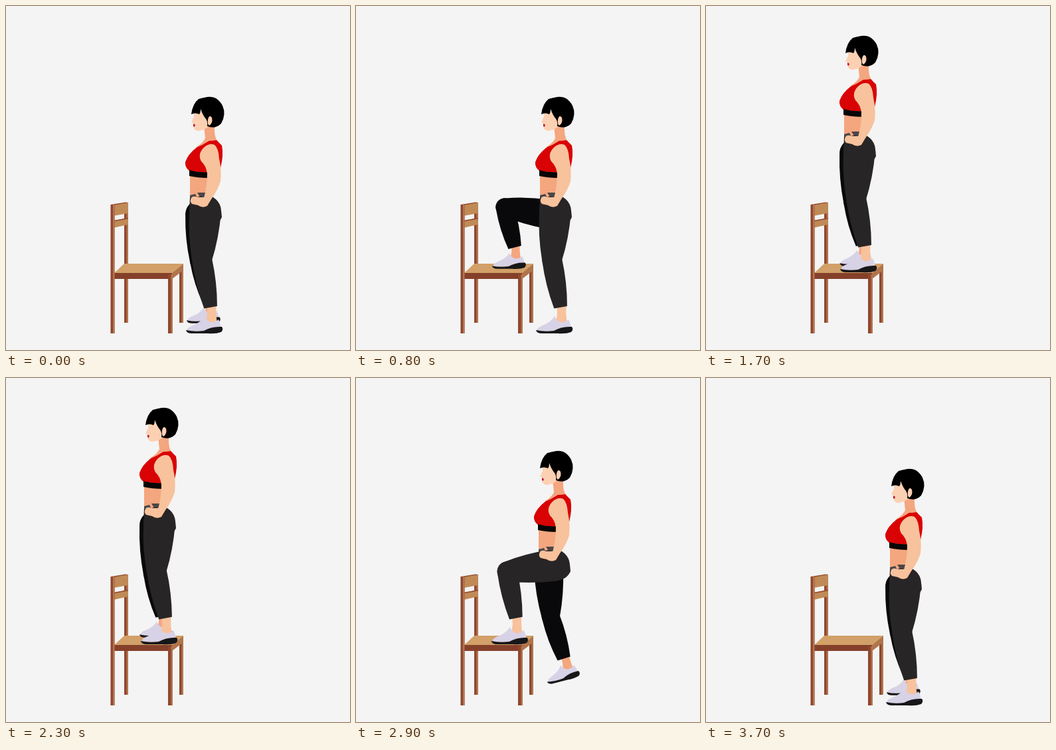
Animation of 518 by 518 pixels, one loop 4 s. Source, as an HTML page with a canvas:

```html
<!DOCTYPE html>
<html lang="en">
<head>
<meta charset="utf-8">
<title>Chair step-up</title>
<style>
html, body { margin: 0; width: 100%; height: 100%; overflow: hidden; background: #f4f4f4; }
canvas { display: block; width: 518px; height: 518px; }
</style>
</head>
<body>
<canvas id="stage"></canvas>
<script>
const canvas = document.getElementById('stage');
const ctx = canvas.getContext('2d');
const dpr = window.devicePixelRatio || 1;
canvas.width = canvas.height = 518 * dpr;

const SKIN = '#f7c29c', WARM = '#f4a67f';

// Key points: time, x, y
const bodyKeys = [
  [900, 0, 0], [1300, -14, -58], [1700, -69, -92],
  [2400, -69, -92], [2600, -35, -79], [2900, -2, -27], [3050, 0, 0]
];
// Each leg: hip, bone lengths, and ankle key points: time, x, y, foot angle
const near = {
  color: '#282526', skin: SKIN, hip: [300, 309, 24], thigh: 71, shank: 71, knee: 15, size: 1,
  keys: [
    [900, 308, 453, 0], [1300, 318, 384, -18], [1600, 205, 352, 0], [1700, 239, 361, 0],
    [3000, 241, 361, 0], [3300, 282, 376, -12], [3600, 308, 453, 0]
  ]
};
const far = {
  color: '#09090b', skin: WARM, hip: [292, 314, 22], thigh: 69, shank: 62, knee: 13.5, size: 0.92,
  keys: [
    [0, 306, 445, 0], [300, 284, 390, -14], [600, 200, 356, 0], [800, 239, 363, 0],
    [1300, 236, 360, 0], [2400, 235, 358, 0], [2600, 281, 365, -18], [2900, 313, 422, -14],
    [3000, 306, 445, 0]
  ]
};

// Monotone cubic through the keys: smooth, without overshoot
function at(keys, t) {
  const last = keys.length - 1;
  const i = keys.findIndex(k => k[0] > t);
  if (i <= 0) return keys[i ? last : 0].slice(1);
  const [a, b] = [keys[i - 1], keys[i]], span = b[0] - a[0], p = (t - a[0]) / span;
  const slope = (n, j) => n < 1 || n > last ? 0 : (keys[n][j] - keys[n - 1][j]) / (keys[n][0] - keys[n - 1][0]);
  const tangent = (n, j) => {
    const u = slope(n, j), v = slope(n + 1, j);
    return u * v > 0 ? 2 * u * v / (u + v) : 0;
  };
  return a.slice(1).map((v, k) => {
    const j = k + 1;
    return v + (b[j] - v) * p * p * (3 - 2 * p)
      + span * p * (1 - p) * (tangent(i - 1, j) * (1 - p) - tangent(i, j) * p);
  });
}

function fill(color, d) {
  ctx.fillStyle = color;
  ctx.fill(new Path2D(d));
}

function rect(color, x, y, w, h) {
  ctx.fillStyle = color;
  ctx.fillRect(x, y, w, h);
}

// Tapered limb segment with bulging sides and a round or flat end
function taper(color, ax, ay, ra, bx, by, rb, flat) {
  const dir = Math.atan2(by - ay, bx - ax);
  const open = Math.acos((ra - rb) / Math.hypot(bx - ax, by - ay));
  const edge = (x, y, r, angle) => [x + r * Math.cos(angle), y + r * Math.sin(angle)];
  const side = (angle, end) => ctx.quadraticCurveTo(
    ...edge((ax + bx) / 2, (ay + by) / 2, (ra + rb) / 2 + 4, angle), ...end);
  const left = dir - open, right = dir + open;
  ctx.fillStyle = color;
  ctx.beginPath();
  ctx.arc(ax, ay, ra, right, left + 2 * Math.PI);
  side(left, edge(bx, by, rb, left));
  if (flat) ctx.lineTo(...edge(bx, by, rb, right));
  else ctx.arc(bx, by, rb, left, right);
  side(right, edge(ax, ay, ra, right));
  ctx.fill();
}

function foot(skin, x, y, angle, size) {
  ctx.save();
  ctx.translate(x, y + (size - 1) * 50);
  ctx.rotate(angle * Math.PI / 180);
  ctx.scale(size, size);
  fill(skin, 'M-6,-3L9,-3Q7,8 10,24L-8,24Q-3,12 -6,-3Z');
  fill('#d8d2e6', 'M-9,14Q-14,23 -27,28Q-36,31 -36,37L15,36Q17,28 12,19Q7,24 0,23Q-6,21 -9,14Z');
  fill('#171719', 'M-37,35Q-24,38 -10,36Q2,29 17,30Q20,34 16,38Q8,41 -4,40L-28,40Q-36,40 -37,35Z');
  ctx.restore();
}

function leg({ color, skin, hip, thigh, shank, knee, size, keys }, t, dx, dy) {
  const hx = hip[0] + dx, hy = hip[1] + dy;
  const [ax, ay, angle] = at(keys, t);
  const dist = Math.hypot(ax - hx, ay - hy), ux = (ax - hx) / dist, uy = (ay - hy) / dist;
  // Knee from the bone lengths, always slightly bent forward
  const straight = dist >= thigh + shank;
  const along = straight ? dist * thigh / (thigh + shank)
    : (thigh ** 2 - shank ** 2 + dist ** 2) / (2 * dist);
  const bend = Math.max(9, Math.sqrt(Math.max(0, thigh ** 2 - along ** 2)));
  const kx = hx + ux * along - uy * bend, ky = hy + uy * along + ux * bend;
  foot(skin, ax, ay, angle, size);
  taper(color, hx, hy, hip[2], kx, ky, knee);
  taper(color, kx, ky, knee, ax, ay, 10, true);
}

function post(x, y, h, w = 6) {
  rect('#90472e', x, y, w, h);
  rect('#b47650', x + w - 2.5, y, 2.5, h);
}

function chair() {
  post(178, 296, 181);
  post(261, 394, 83);
  fill('#c08a57', 'M162,299L184,296V312L162,316ZM162,323L184,319V329L162,334Z');
  fill('#90472e', 'M158,299L180,295.500L184,296L162,300ZM162,323L184,319V320.500L162,324.500Z');
  fill('#d2a068', 'M178,388H267L250,402H163Z');
  fill('#b0754a', 'M250,402L267,388V398L250,411Z');
  rect('#85402a', 163, 402, 87, 9);
  post(244, 404, 89, 7);
  post(157.5, 299, 194);
}

function torso() {
  fill(WARM, 'M298,180L300,199Q297,206 287,212L290,228H322L319,204Q313,198 314,180Z');
  fill(WARM, 'M277,252H308L304,289H277Z');
  fill('#d90204', 'M306,203Q297,209 287,213Q274,223 270,235Q269,243 277,249L305,251L323,244Q328,224 325,210L317,202Q312,203 306,203Z');
  fill('#080606', 'M276,247Q290,251 306,250V259Q290,259 276,256Z');
}

function arm() {
  fill('#4b4748', 'M277,285L285,283L288,289H277Z');
  fill(SKIN, 'M298,213Q306,206 314,209Q320,214 321,230Q325,248 323,264Q319,277 309,291L303,301Q296,305 289,300L280,298Q276,294 279,289Q282,285 288,288H298Q303,272 303,252Q301,240 294,234Q288,223 298,213Z');
  fill('#4b4748', 'M288,281H300L298,288L291,286Z');
}

function head() {
  fill('#fcd0b3', 'M283,159V167L279,175L283,177L282,182Q284,188 290,188L298,186L306,181V159Z');
  fill('#c5162c', 'M282,177L285,179L284,182L282,181Z');
  fill('#000', 'M279,163Q281,147 290,140Q297,138 303,137Q318,135 326,150Q332,163 324,177Q315,186 303,181Q304,174 301,170Q296,164 293,155Q293,161 291,163Q285,160 279,163Z');
  fill('#fcd0b3', 'M304,171Q306,163 310,168Q312,176 306,180Q303,178 304,171Z');
}

function draw(now) {
  const t = Math.min(3700, Math.floor(now % 4000 / 100) * 100);
  const [dx, dy] = at(bodyKeys, t);
  const onBody = (...parts) => {
    ctx.save();
    ctx.translate(dx, dy);
    parts.forEach(part => part());
    ctx.restore();
  };
  ctx.setTransform(dpr, 0, 0, dpr, 0, 0);
  rect('#f4f4f4', 0, 0, 518, 518);
  chair();
  leg(far, t, dx, dy);
  onBody(torso);
  leg(near, t, dx, dy);
  onBody(
    () => fill(near.color, 'M277,288H312Q325,301 325,318Q319,332 301,332Q280,331 276,312Z'),
    arm, head
  );
  requestAnimationFrame(draw);
}
requestAnimationFrame(draw);
</script>
</body>
</html>
```
